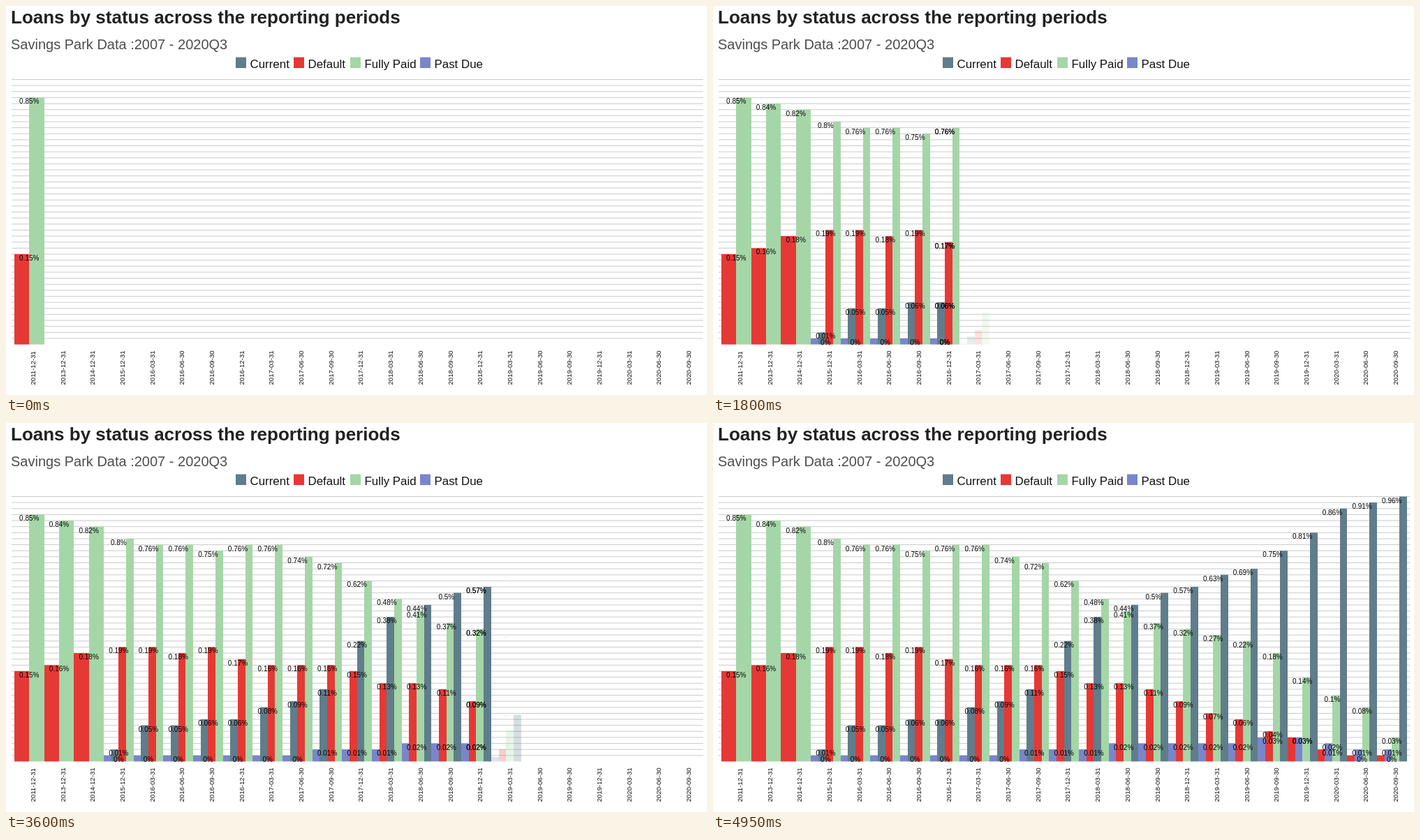
An HTML page with a canvas for the animation above (5000 ms loop, 1004 px wide and 558 px high).

```html
<!DOCTYPE html>
<html lang="en">
<head>
<meta charset="utf-8">
<title>Loans by status</title>
<style>
html, body { margin: 0; width: 100%; height: 100%; overflow: hidden; background: #fff; }
canvas { display: block; }
</style>
</head>
<body>
<canvas id="stage" width="1004" height="558"></canvas>
<script>
const ctx = document.getElementById('stage').getContext('2d');
const COLORS = { C: '#607d8b', D: '#e53935', F: '#a5d6a7', P: '#7986cb' };
const LEFT = 11.95, PITCH = 42.68, BASE = 485.5, STEP = 380 / 44;

// Date, then status letter + hundredths, in drawing order
const groups = `2011-12-31 D15 F85
2013-12-31 D16 F84
2014-12-31 D18 F82
2015-12-31 P0 C1 D19 F80
2016-03-31 P0 C5 D19 F76
2016-06-30 P0 C5 D18 F76
2016-09-30 P0 C6 D19 F75
2016-12-31 P0 C6 D17 F76
2017-03-31 P0 C8 D16 F76
2017-06-30 P0 C9 D16 F74
2017-09-30 P1 C11 D16 F72
2017-12-31 P1 D15 C22 F62
2018-03-31 P1 D13 C38 F48
2018-06-30 P2 D13 F41 C44
2018-09-30 P2 D11 F37 C50
2018-12-31 P2 D9 F32 C57
2019-03-31 P2 D7 F27 C63
2019-06-30 P2 D6 F22 C69
2019-09-30 P3 D4 F18 C75
2019-12-31 D3 P3 F14 C81
2020-03-31 D1 P2 F10 C86
2020-06-30 D0 P1 F8 C91
2020-09-30 D0 P1 F3 C96`.split('\n').map(line => {
  const [date, ...bars] = line.split(' ');
  return { date, bars: bars.map(b => ({ color: COLORS[b[0]], value: +b.slice(1) })) };
});

// The vertical scale is ordinal: one step per distinct value
const levels = [...new Set(groups.flatMap(g => g.bars.map(b => b.value)))].sort((a, b) => a - b);
const heightOf = value => (levels.indexOf(value) + 1) * STEP;
const centre = i => LEFT + (i + 0.5) * PITCH;

function text(str, x, y, size, color = '#222', weight = '', align = 'left') {
  ctx.font = `${weight} ${size}px "Liberation Sans", Arial, sans-serif`;
  ctx.fillStyle = color;
  ctx.textAlign = align;
  ctx.fillText(str, x, y);
}

function drawFrame() {
  ctx.fillStyle = '#fff';
  ctx.fillRect(0, 0, 1004, 558);
  text('Loans by status across the reporting periods', 7, 25, 26, '#222', 'bold');
  text('Savings Park Data :2007 - 2020Q3', 7, 62, 20, '#4d4d4d');
  [['Current', 329, 'C'], ['Default', 412, 'D'], ['Fully Paid', 493, 'F'], ['Past Due', 593, 'P']]
    .forEach(([name, x, key]) => {
      ctx.fillStyle = COLORS[key];
      ctx.fillRect(x, 73.5, 15, 15.5);
      text(name, x + 20.5, 89, 16.9, '#111');
    });
  ctx.fillStyle = '#cbcbcb';
  levels.forEach(v => ctx.fillRect(8, BASE - heightOf(v) - 0.5, 990.5, 1));
  groups.forEach(({ date }, i) => {
    ctx.save();
    ctx.translate(centre(i) + 8.7, 543.5);
    ctx.rotate(-Math.PI / 2);
    text(date, 0, 0, 9.6, '#111');
    ctx.restore();
  });
}

function drawBars(i, grow) {
  const { bars } = groups[i], width = PITCH / bars.length;
  ctx.globalAlpha = grow;
  bars.forEach(({ color, value }, k) => {
    const x = LEFT + i * PITCH + k * width;
    const left = Math.round(x), right = Math.round(x + width);
    const height = heightOf(value) * grow;
    ctx.fillStyle = color;
    ctx.fillRect(left, BASE - height, right - left, height);
  });
  ctx.globalAlpha = 1;
}

function drawLabels(i, grow) {
  ctx.globalAlpha = grow;
  for (const { value } of groups[i].bars) {
    const y = BASE - heightOf(value) + 2.2;
    ctx.save();
    ctx.translate(centre(i), y + 6.8 * grow);
    ctx.scale(grow, grow);
    text(value / 100 + '%', 0, 0, 10, '#000', '', 'center');
    ctx.restore();
  }
  ctx.globalAlpha = 1;
}

// Newest group and its growth at a tick; each entry ends with one tick of rest
function stateAt(tick) {
  if (tick === 0) return { last: 0, t: 1 };
  const early = tick < 56, period = early ? 5 : 4;
  const n = tick - (early ? 1 : 56);
  return {
    last: (early ? 1 : 12) + Math.floor(n / period),
    t: Math.min(1, (n % period + 1) / (period - 1))
  };
}

function render(ms) {
  const { last, t } = stateAt(Math.floor(ms / 50) % 100);
  const grow = (1 - Math.cos(Math.PI * t)) / 2;
  const growth = i => i < last ? 1 : grow;
  drawFrame();
  for (let i = 0; i <= last; i++) drawBars(i, growth(i));
  for (let i = 0; i <= last; i++) drawLabels(i, growth(i));
  // The previous group's labels are overprinted while the next one enters
  if (t < 1) drawLabels(last - 1, 1);
}

let start;
function loop(now) {
  start ??= now;
  render(now - start);
  requestAnimationFrame(loop);
}
render(0);
requestAnimationFrame(loop);
</script>
</body>
</html>
```
